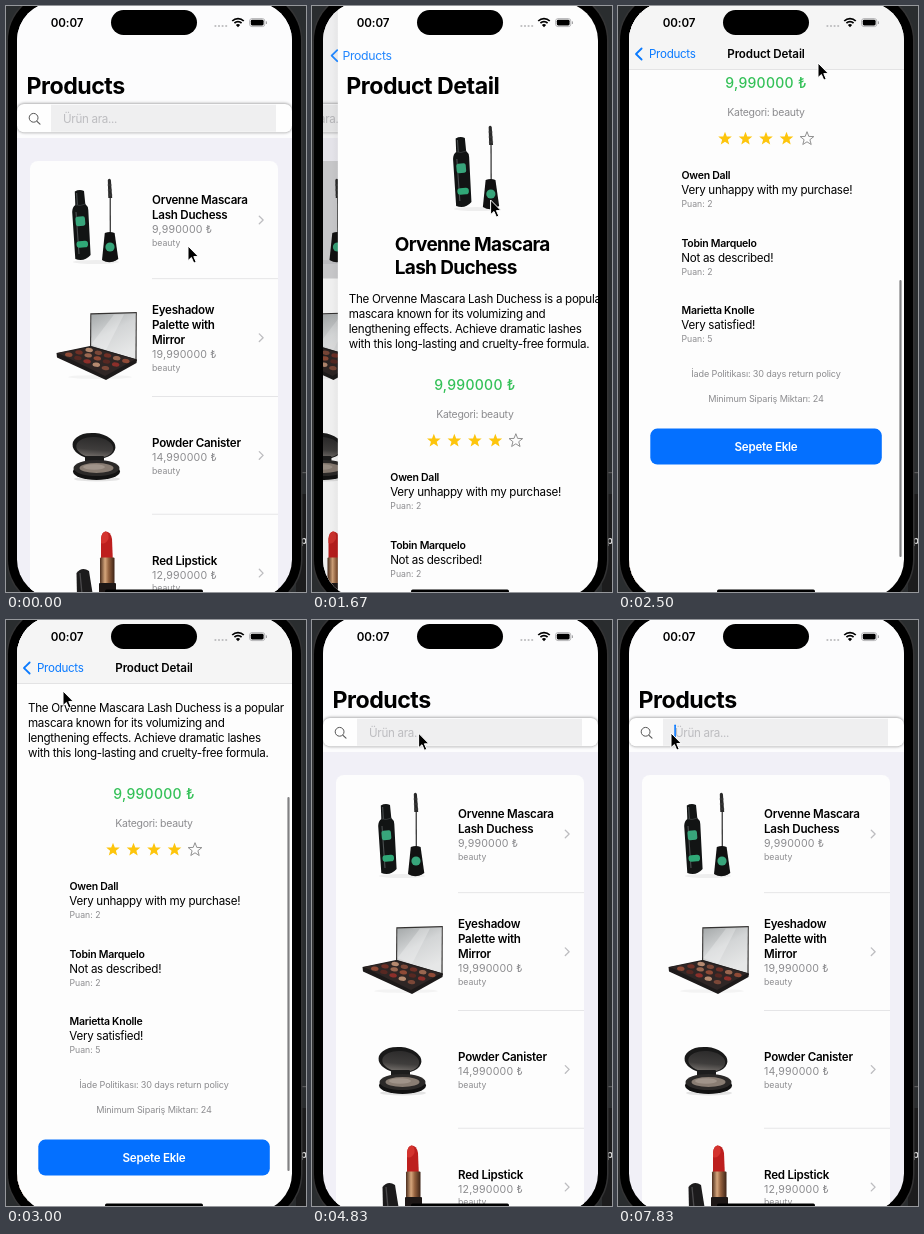
An HTML page that plays this animation: 300 by 586 pixels, repeating every 8000 ms.

```html
<!DOCTYPE html>
<html lang="tr">
<head>
<meta charset="utf-8">
<title>Products</title>
<style>
html, body { margin: 0; width: 100%; height: 100%; overflow: hidden; background: #1c1c1d; }
svg { display: block; width: 100vw; height: 100vh; }
text { font-family: Inter, "Noto Sans", sans-serif; white-space: pre; }
.large { font-size: 23.2px; font-weight: 700; letter-spacing: -.022em; }
.head { font-size: 19px; font-weight: 700; letter-spacing: -.034em; }
.title { font-size: 11.6px; font-weight: 600; letter-spacing: -.022em; }
.bar { font-size: 11.6px; font-weight: 600; letter-spacing: -.01em; }
.body { font-size: 11.6px; letter-spacing: -.025em; }
.cost { font-size: 10.6px; letter-spacing: .018em; fill: #8c8c8f; }
.small { font-size: 8.7px; fill: #8c8c8f; }
.total { font-size: 14px; font-weight: 500; letter-spacing: .02em; fill: #34c158; }
.note { font-size: 10.5px; letter-spacing: -.028em; fill: #8c8c8f; }
.foot { font-size: 9.1px; letter-spacing: -.016em; fill: #8c8c8f; }
.name { font-size: 10.5px; font-weight: 600; letter-spacing: -.025em; }
.mid { text-anchor: middle; }
</style>
</head>
<body>
<svg id="stage" viewBox="0 0 300 586" preserveAspectRatio="none" xmlns="http://www.w3.org/2000/svg"></svg>
<script>
const BLUE = '#0a7aff';
const stage = document.getElementById('stage');

const rect = (x, y, w, h, fill, r = 0, more = '') =>
  `<rect x="${x}" y="${y}" width="${w}" height="${h}" rx="${r}" fill="${fill}" ${more}/>`;
const oval = (x, y, rx, ry, fill, more = '') =>
  `<ellipse cx="${x}" cy="${y}" rx="${rx}" ry="${ry}" fill="${fill}" ${more}/>`;
const shape = (d, fill, more = '') => `<path d="${d}" fill="${fill}" ${more}/>`;
const line = (d, color, w, more = '') =>
  `<path d="${d}" fill="none" stroke="${color}" stroke-width="${w}" ${more}/>`;
const text = (cls, x, y, str, more = '') => `<text class="${cls}" x="${x}" y="${y}" ${more}>${str}</text>`;
const group = (id, inner, more = '') => `<g id="${id}" ${more}>${inner}</g>`;
const range = n => [...Array(n).keys()];
const ROUND = 'stroke-linecap="round" stroke-linejoin="round"';

function mascara() {
  return oval(90, 256, 23, 2, '#000', 'opacity=".06"')
    + shape('M68.8 185.5Q73.5 183 78 185L79.3 198Q82 200 82.3 204L84.6 249Q78 256.5 69.3 253L66.2 206Q66.3 201 69.3 199Z', '#121414')
    + line('M70.6 187L71.4 199M70 206L73 248', '#4a4f50', 1.1)
    + line('M69.4 198.8Q74 200.6 79.2 198', '#3a3e3f', .8)
    + rect(69.6, 210.5, 9.5, 9.5, '#38a57b', 2, 'transform="rotate(-5 74 215)"')
    + rect(70.5, 235, 11.5, 6.5, '#30a877', 3, 'transform="rotate(-3 76 238)"')
    + shape('M101.8 174Q103.3 171.5 104.9 174L106.2 192H102.3Z', '#2a2a2a')
    + line('M101.6 179H105.6M101.8 184H106M102 189H106.3', '#444', .8)
    + line('M104.2 191L104.3 228', '#2a2a2a', 1.2)
    + shape('M98.8 227Q104 225 108.6 227L112.3 253Q104 259 96 254Z', '#111')
    + oval(104, 241, 4.6, 4.6, '#38a57b');
}

function palette() {
  const at = (u, v) => [52 + 33 * v + 47 * u, 348 - 7 * v + 18 * u - 5 * u * v];
  const tones = ['#8f4a36', '#703026', '#b58a70', '#572822', '#9a6750', '#7c4838', '#8c2f2a'];
  const pans = range(15).map(i => {
    const u = .11 + (i % 5) * .195, v = .17 + (i / 5 | 0) * .31;
    const [x, y] = at(u, v).map(n => n.toFixed(1));
    return oval(x, y, 3.8, 2.1, tones[i * 3 % 7], `transform="rotate(8 ${x} ${y})"`);
  }).join('');
  return oval(94, 371, 32, 2, '#000', 'opacity=".04"')
    + shape('M84.3 307.3L130.8 306L130.6 355L84 341Z', '#343231')
    + shape('M85.3 308.4L129.8 307.2L129.4 353L85.2 340Z', 'url(#mirror)')
    + shape('M85.5 338L108 308.5H118L100 344Z', '#fff', 'opacity=".25"')
    + shape('M50.5 347L84 340L131 353.5L130.5 357L100 374L51 351.5Z', '#1d1a1a')
    + shape('M52 347L84 341L129 353.5L99 370Z', '#2f2625')
    + pans;
}

function powder() {
  return oval(91, 473, 23, 2.5, '#000', 'opacity=".1"')
    + oval(88, 440, 21.5, 13, '#191919', 'transform="rotate(5 88 440)"')
    + oval(88.8, 441.5, 18.5, 10.5, 'url(#lid)', 'transform="rotate(5 89 441)"')
    + rect(79, 450, 19, 6, '#1c1c1c', 1)
    + oval(90.5, 465.5, 23.5, 8.5, '#121212')
    + oval(90.5, 462, 23, 8, '#2b2928')
    + oval(90.5, 462, 17, 5, '#897d73')
    + oval(88, 461, 11, 2.8, '#a0948a');
}

function lipstick() {
  return shape('M70.5 567Q76 560 83 565L87 590H71Z', '#1c1b1c')
    + line('M74 567L76 588', '#4b4a4c', 1.3)
    + shape('M95 553V533Q95.5 526.5 99.5 525.6Q104.5 525.5 106 533L106.8 553Z', '#bd1f1e')
    + shape('M95 533Q95.5 526.5 99.5 525.6Q103 525.8 102.5 533Q99 539 95 537Z', '#d4332e')
    + rect(94, 551.5, 14.5, 26, 'url(#gold)', 1)
    + rect(93, 577, 17, 12, '#1d1716', 1);
}

const ITEMS = [
  [['Orvenne Mascara', 'Lash Duchess'], '9,990000 ₺', mascara],
  [['Eyeshadow', 'Palette with', 'Mirror'], '19,990000 ₺', palette],
  [['Powder Canister'], '14,990000 ₺', powder],
  [['Red Lipstick'], '12,990000 ₺', lipstick]
];

function row([names, cost, art], i) {
  const mid = 214 + 117.7 * i, half = 7.5 * (names.length - 1), y = mid + 2.3 + half;
  return art()
    + names.map((n, j) => text('title', 146, mid - 8.4 - half + 15 * j, n)).join('')
    + text('cost', 146, y + 3.2, cost)
    + text('small', 146, y + 15.9, 'beauty')
    + line(`M253.3 ${mid - 3.8}l3.8 3.8l-3.8 3.8`, '#bdbdc0', 1.3, ROUND)
    + rect(146, mid + 58.4, 126, .7, '#dcdcde');
}

function listView() {
  return rect(11, -5, 275, 600, '#f1f0f7')
    + rect(11, -5, 275, 137, '#fcfcfd')
    + rect(11, 97.5, 275, 29, '#000', 7, 'opacity=".4" filter="url(#soft)"')
    + rect(11, 98, 275, 28.2, '#fefefe', 7)
    + rect(45, 98.7, 225, 27, '#efeff0')
    + line('M31 115.4L34 118.2', '#555', 1.1, ROUND)
    + '<circle cx="27.6" cy="111.8" r="4.4" fill="none" stroke="#555" stroke-width="1"/>'
    + text('body', 57, 116.8, 'Ürün ara...', 'fill="#bdbdc0"')
    + rect(24, 155, 248, 460, '#fdfdfd', 8)
    + shape('M24 272.5V163Q24 155 32 155H264Q272 155 272 163V272.5Z', '#d1d1d4', 'id="picked"')
    + ITEMS.map(row).join('')
    + rect(56.3, 104.5, 1.6, 15.5, BLUE, .8, 'id="caret"')
    + rect(11, -5, 275, 600, '#000', 0, 'id="dim"');
}

function star(x, y, full) {
  const pts = range(10).map(i => {
    const a = Math.PI * (i / 5 - .5), r = i % 2 ? 3 : 7.1;
    return (x + r * Math.cos(a)).toFixed(1) + ',' + (y + r * Math.sin(a)).toFixed(1);
  }).join(' ');
  return full ? `<polygon points="${pts}" fill="#fdc50c"/>`
    : `<polygon points="${pts}" fill="none" stroke="#858585" stroke-width=".9" stroke-linejoin="round"/>`;
}

function detailView() {
  const about = ['The Orvenne Mascara Lash Duchess is a popular', 'mascara known for its volumizing and',
    'lengthening effects. Achieve dramatic lashes', 'with this long-lasting and cruelty-free formula.'];
  const reviews = [['Owen Dall', 'Very unhappy with my purchase!', 2],
    ['Tobin Marquelo', 'Not as described!', 2], ['Marietta Knolle', 'Very satisfied!', 5]];
  const page = text('large', 19.5, 88, 'Product Detail')
    + `<g transform="translate(60 -53)">${mascara()}</g>`
    + text('head', 67.8, 244.6, 'Orvenne Mascara') + text('head', 67.8, 268, 'Lash Duchess')
    + about.map((s, i) => text('body', 22, 297.1 + 15 * i, s)).join('')
    + text('total mid', 148, 384, '9,990000 ₺')
    + text('note mid', 148, 411.5, 'Kategori: beauty')
    + range(5).map(i => star(107 + 20.5 * i, 434.8, i < 4)).join('')
    + reviews.map(([who, what, mark], i) => {
      const y = 475.3 + 67.5 * i;
      return text('name', 63.5, y, who) + text('body', 63.3, y + 15, what)
        + text('small', 63.5, y + 27.8, 'Puan: ' + mark);
    }).join('')
    + text('foot mid', 148, 673.4, 'İade Politikası: 30 days return policy')
    + text('foot mid', 148, 698.1, 'Minimum Sipariş Miktarı: 24')
    + rect(32.3, 724.6, 231.5, 36, '#0470ff', 7)
    + text('title mid', 148, 747, 'Sepete Ekle', 'fill="#fff"');
  return rect(5, -5, 6, 600, 'url(#edge)')
    + rect(11, -5, 275, 600, '#fdfdfd')
    + group('page', page)
    + group('navbar', rect(11, -5, 275, 68, '#f5f5f5') + rect(11, 63, 275, .7, '#d8d8da')
      + text('bar mid', 148, 52, 'Product Detail'))
    + rect(281.4, 177, 2.2, 374, '#818183', 1.1, 'id="thumb"');
}

function statusBar() {
  const arc = r => `M${232 - r * .72} ${20.6 - r * .7}A${r} ${r} 0 0 1 ${232 + r * .72} ${20.6 - r * .7}`;
  return text('bar mid', 61, 20.8, '00:07')
    + rect(105, 4, 86, 25, '#000', 12.5)
    + range(4).map(i => oval(209.4 + 3.6 * i, 20, 1.1, 1.1, '#bdbdbf')).join('')
    + line(arc(8) + arc(5), '#000', 1.7)
    + shape('M232 21.2L229.9 18.9Q232 17.2 234.1 18.9Z', '#000')
    + rect(243.6, 12.6, 15.2, 8, 'none', 2.4, 'stroke="#a5a5a7" stroke-width=".8"')
    + rect(244.8, 13.8, 12.8, 5.6, '#000', 1.4)
    + rect(259.9, 15.2, 1.1, 2.8, '#a5a5a7', .5)
    + rect(99, 583.5, 98, 3.4, '#000', 1.7);
}

const stops = list => list.map(([o, c, a = 1]) =>
  `<stop offset="${o}" stop-color="${c}" stop-opacity="${a}"/>`).join('');
const fade = (id, list, more = '') => `<linearGradient id="${id}" ${more}>${stops(list)}</linearGradient>`;

stage.innerHTML = '<defs>'
  + fade('mirror', [[0, '#a3a7a8'], [.5, '#d3d5d6'], [1, '#e6e7e7']], 'x2=".5" y2="1"')
  + fade('lid', [[0, '#2c2b2b'], [.6, '#3f3d3c'], [1, '#77726e']], 'x2="0" y2="1"')
  + fade('gold', [[0, '#4a2c1c'], [.35, '#d6a67c'], [.6, '#94613e'], [1, '#3d2316']])
  + fade('edge', [[0, '#000', 0], [1, '#000', .035]])
  + '<filter id="soft" x="-10%" y="-60%" width="120%" height="220%"><feGaussianBlur stdDeviation="1.6"/></filter>'
  + '<clipPath id="screen"><rect x="11" y="-4" width="275" height="596" rx="38.5"/></clipPath></defs>'
  + rect(0, 0, 300, 586, '#2a2d2f')
  + rect(290, 466, 10, 1.2, '#5b5b5c') + rect(290, 488, 10, 100, '#1c1c1d')
  + text('name', 294.5, 537.5, 'p', 'fill="#dedede"')
  + rect(.5, -14.5, 296, 617, '#343435', 49)
  + rect(2, -13, 293, 614, '#000', 47.5)
  + '<g clip-path="url(#screen)">'
  + group('list', listView())
  + group('detail', detailView())
  + text('large', 0, 0, 'Products', 'id="bigTitle"')
  + group('back', text('body', 0, 0, 'Products', `fill="${BLUE}"`))
  + line('M23.6 42.5L18 48L23.6 53.5', BLUE, 1.8, 'id="arrow" ' + ROUND)
  + statusBar() + '</g>'
  + shape('M0 0V14.6L3.4 11.5L5.8 17.1L8.2 16.1L5.8 10.6H10.4Z', '#000',
    'id="cursor" stroke="#fff" stroke-width="1" stroke-linejoin="round"');

const el = {};
stage.querySelectorAll('[id]').forEach(n => el[n.id] = n);
const set = (id, attrs) => { for (const k in attrs) el[id].setAttribute(k, attrs[k]); };

const CURSOR = [[0, 182, 240], [2, 179, 213], [3, 179, 213], [5, 178.6, 194], [10, 178.6, 194],
  [12, 186, 300], [13, 190, 215], [14, 196, 110], [15, 200, 57], [16, 165, 55], [17, 105, 60],
  [18, 57, 71], [19, 47, 54], [20, 45, 50], [21, 62, 64], [22, 97, 100], [23, 112, 110],
  [24, 117, 112], [28, 117, 112], [33, 65, 118], [34, 65, 118], [36, 144, 115], [39, 144, 115],
  [42, 110, 95], [44, 62, 99], [46, 33, 112], [47, 53, 113]];
const SCROLL = [[12, 0], [13, 80], [14, 205], [15, 302], [16, 262], [17, 218], [18, 205]];

function along(keys, k, dim = 1) {
  const i = keys.findIndex(key => key[0] > k);
  if (i < 0) return keys[keys.length - 1][dim];
  if (!i) return keys[0][dim];
  const a = keys[i - 1], b = keys[i];
  return a[dim] + (b[dim] - a[dim]) * (k - a[0]) / (b[0] - a[0]);
}
const clamp = v => Math.max(0, Math.min(1, v));
const mix = (a, b, p) => a + (b - a) * p;
function spring(ms) {
  const u = Math.max(0, ms) * .016, p = 1 - (1 + u) * Math.exp(-u);
  return p > .997 ? 1 : p;
}

const PUSH = 1376, POP = 3419;

function draw(time) {
  const k = Math.min(47, Math.floor((time % 8000 + 4) * .006));
  const ms = k * 1000 / 6;
  const p = ms < POP ? spring(ms - PUSH) : 1 - spring(ms - POP);
  const scroll = along(SCROLL, k);

  set('list', { transform: `translate(${-83 * p} 0)` });
  set('dim', { opacity: .06 * p });
  set('picked', { opacity: k < 8 ? 0 : clamp(1 - (ms - POP) / 300) });
  set('caret', { opacity: k === 47 ? 1 : 0 });

  set('detail', { transform: `translate(${275 * (1 - p)} 0)`, visibility: p > 0 ? 'visible' : 'hidden' });
  set('page', { transform: `translate(0 ${-scroll})` });
  set('navbar', { opacity: clamp((scroll - 25) / 15) });
  const top = scroll > 205 ? scroll - 28 : 177 - (205 - scroll) * .5;
  set('thumb', { y: top, height: Math.min(374, 551 - top), opacity: k < 13 ? 0 : clamp((20 - k) / 2) });

  // The large title shrinks into the back label.
  const x = mix(20.6, 31, p), y = mix(79.5, 48, p), width = mix(98, 47, p);
  set('bigTitle', { transform: `translate(${x} ${y}) scale(${width / 98}) translate(0 8.5)`, opacity: (1 - p) ** 2 });
  set('back', { transform: `translate(${x} ${y}) scale(${width / 47}) translate(0 4.2)`, opacity: p * p });
  set('arrow', { transform: `translate(${(1 - p) * 30} ${y - 48})`, opacity: p * p });
  set('cursor', { transform: `translate(${along(CURSOR, k, 1)} ${along(CURSOR, k, 2)})` });
}

const start = performance.now();
function tick() {
  draw(performance.now() - start);
  requestAnimationFrame(tick);
}
tick();
</script>
</body>
</html>
```
